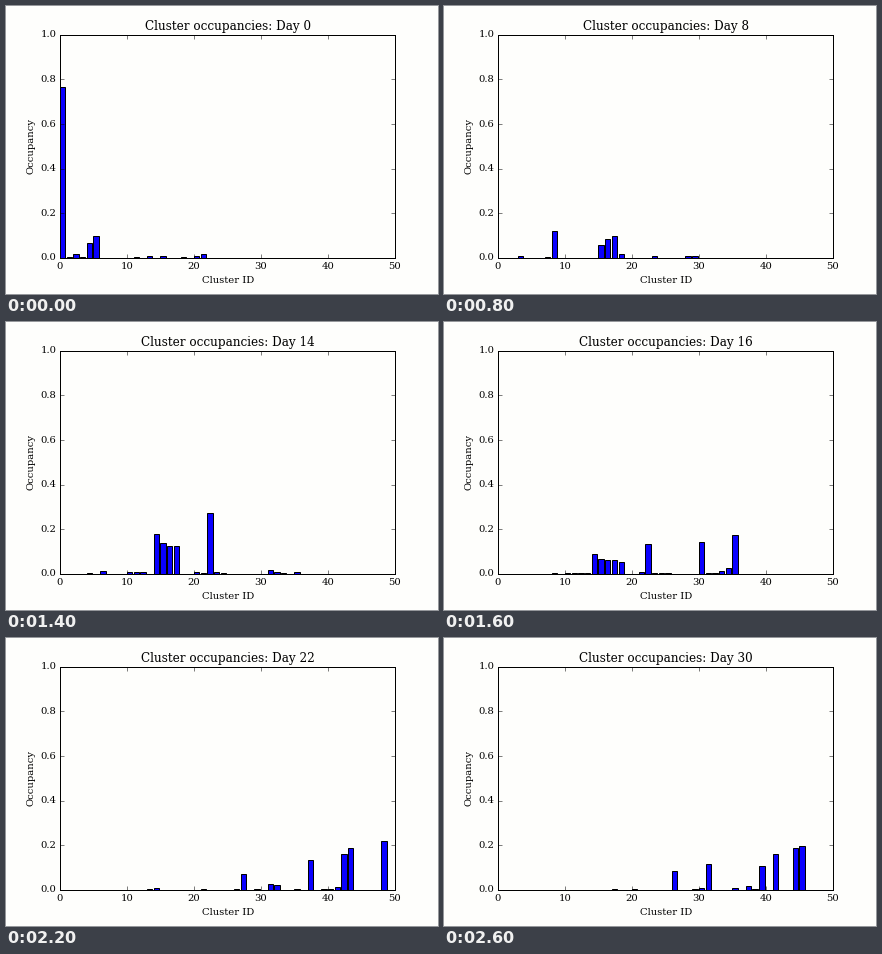
A matplotlib script for the animation above (2800 ms loop, 432 by 288 pixels).

```python
import matplotlib.pyplot as plt
import numpy as np
from matplotlib.animation import FuncAnimation

PAPER = "#fefefc"
CLUSTERS = 50
STEPS = 14
REACH = 2        # steps over which a peak grows and fades
UNIT = 1 / 228   # occupancy of a single member
NUDGE = 0.45     # in pixels, makes text positions round up

# Key points: step -> {cluster: occupancy at its peak}
PEAKS = {
    0: {0: 0.767, 4: 0.066, 5: 0.098},
    2: {2: 0.452, 3: 0.125, 7: 0.079, 11: 0.143},
    5: {8: 0.246, 15: 0.12, 16: 0.169, 17: 0.2},
    7: {14: 0.178, 15: 0.138, 16: 0.125, 17: 0.125, 22: 0.273},
    9: {18: 0.106, 30: 0.286, 35: 0.349},
    11: {27: 0.07, 37: 0.133, 42: 0.16, 43: 0.187, 48: 0.218},
    13: {26: 0.083, 31: 0.116, 39: 0.106, 41: 0.16, 44: 0.188, 45: 0.196},
}

plt.style.use("classic")
plt.rcParams.update({
    "font.family": "DejaVu Serif",
    "font.size": 10,
    "axes.titlesize": 12,
    "savefig.dpi": 72,
    "savefig.facecolor": PAPER,
})


def stragglers(step):
    """Scattered small clusters in a window that drifts to the right."""
    rng = np.random.default_rng(step)
    ids = np.arange(CLUSTERS)
    window = (ids >= step**2 / 14) & (ids < 25 + 1.5 * step)
    present = window & (rng.random(CLUSTERS) < 0.35)
    return present * rng.geometric(0.5, CLUSTERS) * UNIT


def occupancy(step):
    heights = np.zeros(CLUSTERS)
    for when, peaks in PEAKS.items():
        weight = max(0, 1 - abs(step - when) / REACH)
        for cluster, height in peaks.items():
            heights[cluster] += weight * height
    return np.maximum(heights, stragglers(step))


def day(step):
    return 30 if step == STEPS - 1 else 2 * step


fig = plt.figure(figsize=(6, 4), dpi=72, facecolor=PAPER)
ax = fig.add_axes([0.125, 0.125, 0.775, 0.775], facecolor=PAPER)
bars = ax.bar(range(CLUSTERS), [0] * CLUSTERS, width=0.8, align="edge",
              color="#0a00ff", edgecolor="black", linewidth=1)
ax.set_xlim(0, 50)
ax.set_ylim(0, 1)
ax.set_xticks(range(0, 51, 10))
ax.set_yticks([i / 5 for i in range(6)])
ax.tick_params(axis="y", pad=4 - NUDGE)

middle = 0.5 + NUDGE / ax.bbox.width
ax.set_xlabel("Cluster ID", x=middle)
ax.set_ylabel("Occupancy", labelpad=5 + NUDGE)
title = ax.set_title("", x=middle)


def draw(step):
    for bar, height in zip(bars, occupancy(step)):
        bar.set_height(height)
        bar.set_visible(height > 0)
    title.set_text(f"Cluster occupancies: Day {day(step)}")
    return [*bars, title]


anim = FuncAnimation(fig, draw, frames=STEPS, init_func=lambda: draw(0),
                     interval=200, repeat=True, repeat_delay=0, blit=False)
plt.show()
```
